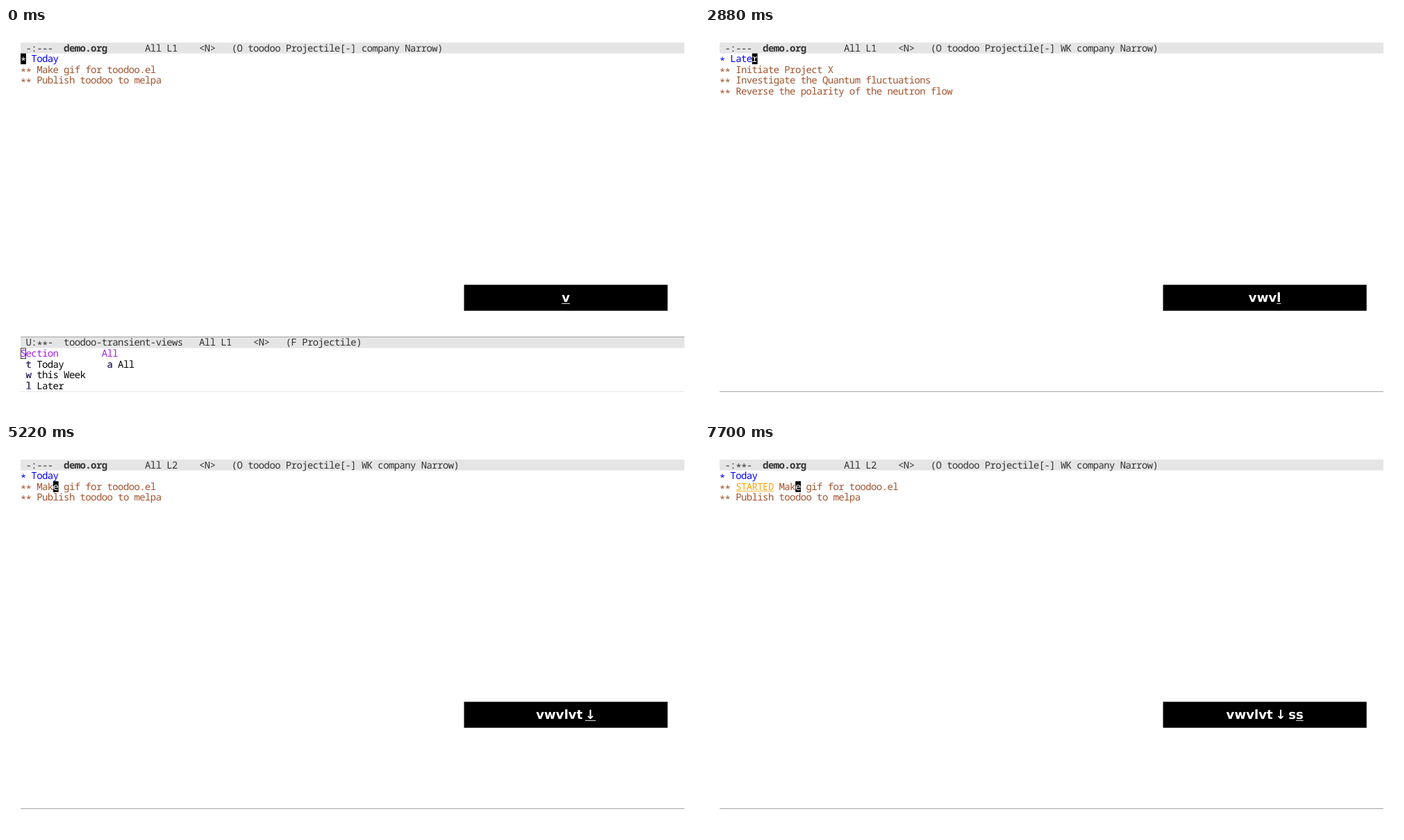
Recreate the animation shown at these times as an HTML page with a canvas. Size 998 px wide and 561 px high, loop 8000 ms.

```html
<!DOCTYPE html>
<html lang="en">
<head>
<meta charset="utf-8">
<title>Todo views</title>
<style>
  html, body { margin: 0; width: 998px; height: 561px; overflow: hidden; background: #fff; }
  canvas { display: block; }
</style>
</head>
<body>
<canvas id="stage" width="998" height="561"></canvas>
<script>
const ctx = document.getElementById('stage').getContext('2d');
// The layout is a 1280 x 720 screen with 10 x 20 character cells.
const SCALE = 998 / 1280, LOOP = 8000;
const EDGE = 27, WIDTH = 1226, CELL = 10, ROW = 20, BOTTOM = 672;
const MONO = '18px "Noto Sans Mono", monospace';
const KEY_FONT = 'bold 23.3px "DejaVu Sans", sans-serif';
const BAR = '#e5e5e5', INK = '#333', RULE = '#888';
const HEADING = '#a020f0', KEY = '#483d8b', ACTIVE = '#ffa500';

const lists = {
  today: ['* Today', '** Make gif for toodoo.el', '** Publish toodoo to melpa'],
  started: ['* Today', '** STARTED Make gif for toodoo.el', '** Publish toodoo to melpa'],
  week: ['* This Week', '** Write blog post about toodoo', '** Fix issue #120 in project ABC'],
  later: ['* Later', '** Initiate Project X', '** Investigate the Quantum fluctuations',
    '** Reverse the polarity of the neutron flow'],
};
// Menu items: [row, column, text]; a row of 0 is a heading.
const menus = {
  views: [[0, 0, 'Section'], [0, 15, 'All'], [1, 1, 't Today'], [1, 16, 'a All'],
    [2, 1, 'w this Week'], [3, 1, 'l Later']],
  state: [[0, 0, 'State management'], [1, 1, 's Started'], [2, 1, 'b Blocked'],
    [3, 1, 'd Done'], [4, 1, 'c Clear']],
};
const scenes = [
  { at: 0, list: 'today', row: 1, col: 0, keys: 'v', menu: 'views' },
  { at: 1000, list: 'week', row: 1, col: 10, keys: 'vw' },
  { at: 1390, list: 'week', row: 1, col: 10, keys: 'vwv' },
  { at: 2880, list: 'later', row: 1, col: 6, keys: 'vwvl' },
  { at: 3660, list: 'later', row: 1, col: 6, keys: 'vwvlv', menu: 'views' },
  { at: 4900, list: 'today', row: 1, col: 6, keys: 'vwvlvt' },
  { at: 5220, list: 'today', row: 2, col: 6, keys: 'vwvlvt\u2009↓' },
  { at: 6820, list: 'today', row: 2, col: 6, keys: 'vwvlvt\u2009↓\u2009s', menu: 'state' },
  { at: 7700, list: 'started', row: 2, col: 14, keys: 'vwvlvt\u2009↓\u2009ss' },
];

const cellX = col => EDGE + col * CELL;

function rect(x, y, w, h, color) {
  ctx.fillStyle = color;
  ctx.fillRect(x, y, w, h);
}

// Centres each character in its cell; asterisks sit at mid height.
function write(text, col, top, color, weight = '') {
  ctx.font = `${weight} ${MONO}`;
  ctx.textAlign = 'center';
  ctx.fillStyle = color;
  [...text].forEach((char, i) =>
    ctx.fillText(char, cellX(col + i + 0.5), top + 16 + (char === '*' ? 4 : 0)));
}

function drawList({ list, row, col, menu }) {
  const lines = lists[list];
  rect(EDGE, EDGE, WIDTH, ROW, BAR);
  write(list === 'started' ? '-:**-' : '-:---', 1, EDGE, INK);
  write('demo.org', 8, EDGE, INK, 'bold');
  write(`All L${row}    <N>   (O toodoo Projectile[-] ${menu ? '' : 'WK '}company Narrow)`, 23, EDGE, INK);

  lines.forEach((line, i) => {
    const top = EDGE + (i + 1) * ROW;
    const [, stars, state = '', rest] = line.match(/^(\*+ )(STARTED)?(.*)/);
    const color = i ? '#a0522d' : '#00f';
    const start = stars.length, end = start + state.length;
    write(stars, 0, top, color);
    write(state, start, top, ACTIVE);
    rect(cellX(start), top + 18, state.length * CELL, 1, ACTIVE);
    write(rest, end, top, color);
  });

  const top = EDGE + row * ROW;
  rect(cellX(col), top, CELL, ROW, '#000');
  write(lines[row - 1][col], col, top, '#fff');
}

function drawMenu(name) {
  rect(EDGE, BOTTOM, WIDTH, 1, name ? '#ddd' : RULE);
  if (!name) return;
  const items = menus[name];
  const first = BOTTOM - (items.at(-1)[0] + 1) * ROW, bar = first - ROW;
  rect(EDGE, bar, WIDTH, ROW, BAR);
  rect(EDGE, bar - 1, WIDTH, 1, RULE);
  write(`U:**-  toodoo-transient-${name}   All L1    <N>   (F Projectile)`, 1, bar, INK);
  for (const [row, col, text] of items) {
    const top = first + row * ROW;
    write(text, col, top, row ? '#000' : HEADING);
    if (row) write(text[0], col, top, KEY);
  }
  ctx.strokeStyle = '#000';
  ctx.strokeRect(EDGE + 0.5, first + 0.5, CELL - 1, ROW - 1);
}

// Pressed keys, centred, with the latest one underlined.
function drawKeys(keys) {
  rect(846, 475, 376, 48, '#000');
  ctx.font = KEY_FONT;
  ctx.textAlign = 'left';
  const width = ctx.measureText(keys).width;
  const last = ctx.measureText(keys.at(-1)).width;
  const x = 1034 - width / 2;
  ctx.fillStyle = '#fff';
  ctx.fillText(keys, x, 507);
  rect(x + width - last, 509, last, 1.2, '#fff');
}

function draw() {
  const time = (performance.now() - start) % LOOP;
  const scene = scenes.findLast(({ at }) => at <= time);
  rect(0, 0, 1280, 720, '#fff');
  drawList(scene);
  drawMenu(scene.menu);
  drawKeys(scene.keys);
  requestAnimationFrame(draw);
}

ctx.scale(SCALE, SCALE);
ctx.textRendering = 'geometricPrecision';
const start = performance.now();
draw();
</script>
</body>
</html>
```
